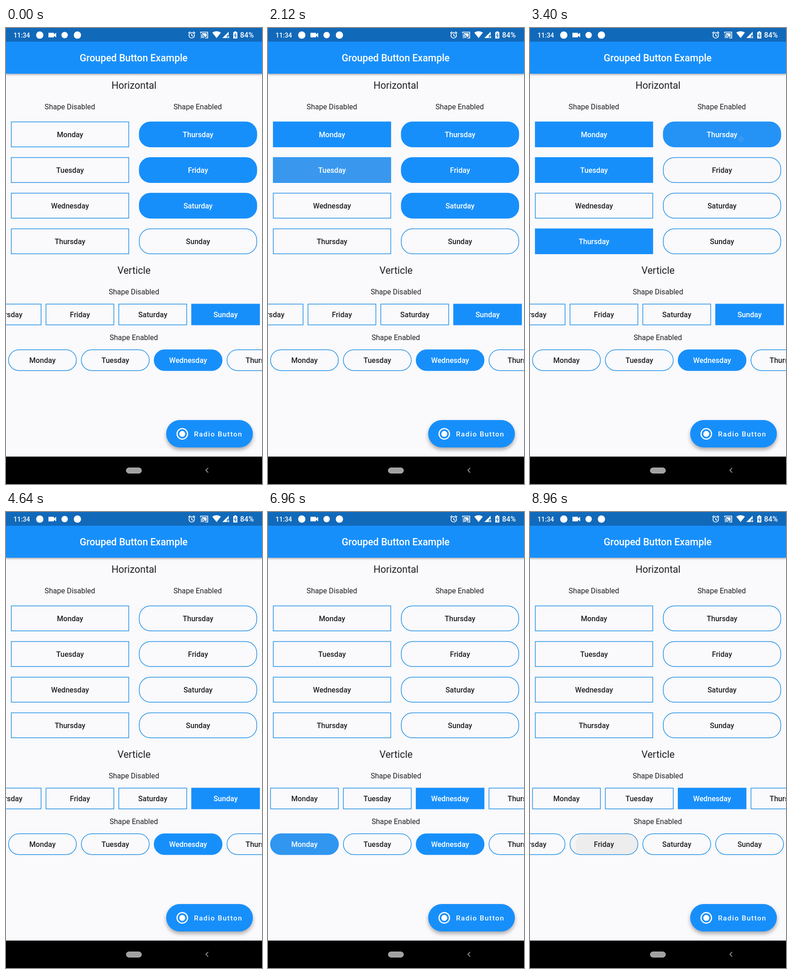
These frames come from a looping animation (561 by 998 pixels, 9 s). An HTML page:

```html
<!DOCTYPE html>
<html lang="en">
<head>
<meta charset="utf-8">
<title>Grouped buttons</title>
<style>
  html, body { margin: 0; width: 100%; height: 100%; overflow: hidden; }
  body { position: relative; background: #faf9fc; font-family: Roboto, sans-serif; }
  div, svg { position: absolute; left: 0; top: 0; }
  .status { width: 561px; height: 30px; background: #1169ba; }
  .bar { top: 30px; width: 561px; height: 70px; background: #178ffb; box-shadow: 0 2px 4px rgba(0,0,0,.34); }
  .nav { top: 938px; width: 561px; height: 60px; background: #000; }
  .fab { left: 351px; top: 858px; width: 190px; height: 60px; border-radius: 30px; background: #178ffb;
         box-shadow: 0 5px 9px rgba(0,0,0,.32); }
  .head { font-size: 21.5px; }
  .label { font-size: 16.1px; }
  .btn rect { fill: transparent; stroke: #2493e6; stroke-width: 1.5px; }
  .btn text { fill: #202124; font-size: 16.1px; font-weight: 500; text-anchor: middle; }
  .btn.on rect { fill: #178ffb; stroke: #178ffb; }
  .btn.on text { fill: #fff; }
  .ink { fill: #bcbcbc; }
  .glow { fill: #178ffb; opacity: .14; }
</style>
</head>
<body>
<div class="bar"></div>
<div class="status"></div>
<div class="nav"></div>
<div class="fab"></div>

<svg width="561" height="998" viewBox="0 0 561 998" fill="none">
  <g id="buttons"></g>
  <g fill="#202124" text-anchor="middle">
    <g class="head">
      <text x="280.5" y="132.6">Horizontal</text>
      <text x="280.5" y="538.3">Verticle</text>
    </g>
    <g class="label">
      <text x="140" y="177.5">Shape Disabled</text>
      <text x="420" y="177.5">Shape Enabled</text>
      <text x="280.3" y="583">Shape Disabled</text>
      <text x="280" y="683">Shape Enabled</text>
    </g>
  </g>
  <g fill="#fff" font-weight="500">
    <text x="279.8" y="73" font-size="21.3" text-anchor="middle">Grouped Button Example</text>
    <text x="412" y="893.8" font-size="15.3" letter-spacing="1.5">Radio Button</text>
    <text x="16.5" y="20.6" font-size="14.2">11:34</text>
    <text x="513" y="21" font-size="16">84%</text>
    <circle cx="74" cy="15.5" r="8"/>
    <circle cx="128.5" cy="15.5" r="7"/>
    <circle cx="156.5" cy="15.5" r="8"/>
    <path d="M93 10.5h12v3.5l5-3.5v10l-5-3.5v3.5h-12z"/>
    <path d="M452 10q9.5-6 19 0l-9.5 12z"/>
    <path d="M474 22L488 8v8h-4v6z"/>
    <path d="M498 9h2.5v-1.7h4V9h2.5v14h-9z"/>
    <path d="M429 11.500h10.500v8h-4q-1.500-5-6.500-6z"/>
    <circle cx="386.300" cy="888.300" r="6.500"/>
  </g>
  <g stroke="#fff" stroke-width="1.7">
    <circle cx="407" cy="16" r="6"/>
    <path d="M407 12.5v4l3 1.8M399.5 11.5l4-3.5M414.5 11.5l-4-3.5"/>
    <path d="M426.5 12V9h15.5v13h-5.5M426.5 21.5h2M426.5 18a4 4 0 0 1 4 4M426.5 15a7 7 0 0 1 7 7"/>
    <path d="M485 18l4 4m0-4l-4 4" stroke-width="1.3"/>
    <path d="M503.3 11.5l-2.5 5h3.5l-2.5 4.5" stroke="#1169ba" stroke-width="1.4"/>
    <circle cx="386.3" cy="888.3" r="11.5" stroke-width="2.5"/>
  </g>
  <rect x="263.5" y="962.5" width="33.5" height="12" rx="6" fill="#a2a2a2" stroke="#b8b8b8"/>
  <path d="M443 963l-5 5 5 5" stroke="#b0b0b0" stroke-width="1.5"/>
</svg>

<script>
const LOOP = 9000, TOGGLE = 100, TAP = 290;
const PITCH = 159.6, SCROLL = 556.3;
const days = ['Monday', 'Tuesday', 'Wednesday', 'Thursday', 'Friday', 'Saturday', 'Sunday'];
const root = document.getElementById('buttons');
const clamp = v => Math.max(0, Math.min(1, v));
let clipCount = 0;

function set(el, attrs) {
  for (const key in attrs) el.setAttribute(key, attrs[key]);
  return el;
}

function add(parent, tag, attrs = {}) {
  const el = document.createElementNS('http://www.w3.org/2000/svg', tag);
  parent.append(el);
  return set(el, attrs);
}

// taps: { day: [times] }, selected: days that begin filled
function makeButton(parent, day, x, y, size, selected, taps) {
  const { width, height } = size;
  const el = add(parent, 'g', { class: 'btn', transform: `translate(${x} ${y})` });
  const id = 'clip' + clipCount++;
  add(add(el, 'clipPath', { id }), 'rect', size);
  add(el, 'rect', size);
  const ink = add(el, 'g', { class: 'ink', 'clip-path': `url(#${id})` });
  const highlight = add(ink, 'path', { d: `M0 0H${width}V${height}H0z` });
  const splash = add(ink, 'circle', { cx: width * .66, cy: height * .69, opacity: .12 });
  add(el, 'text', { x: width / 2, y: height / 2 + 5.8 }).textContent = day;
  return { el, ink, highlight, splash, on: selected.includes(day), taps: taps[day] || [] };
}

function makeColumn(x, names, rx, selected, taps) {
  const size = { width: 257.4, height: 54.7, rx };
  return names.map((day, i) => makeButton(root, day, x, 205.5 + 78 * i, size, selected, taps));
}

function makeRow(y, rx, selected, taps) {
  const size = { width: 148.8, height: 45.4, rx };
  const strip = add(root, 'g');
  const buttons = days.map((day, i) => makeButton(strip, day, 5.5 + PITCH * i, y, size, selected, taps));
  const glow = add(root, 'ellipse', { class: 'glow', cy: y + 23, ry: 28 });
  return { strip, glow, buttons };
}

const firstRow = makeRow(604.3, 0, ['Monday', 'Tuesday', 'Wednesday', 'Sunday'],
  { Monday: [6080], Tuesday: [6290] });
const secondRow = makeRow(704.3, 22.7, ['Wednesday', 'Friday', 'Saturday', 'Sunday'],
  { Monday: [6740], Saturday: [7730], Sunday: [8060], Friday: [8840] });

const buttons = [
  ...makeColumn(11.6, days.slice(0, 4), 0, [],
    { Monday: [1360, 3830], Tuesday: [1920, 4070], Thursday: [2440, 4340] }),
  ...makeColumn(292.1, days.slice(3), 24.5, ['Thursday', 'Friday', 'Saturday'],
    { Saturday: [2900], Friday: [3120], Thursday: [3360] }),
  ...firstRow.buttons, ...secondRow.buttons
];

function drawButton(b, time) {
  const toggles = b.taps.filter(t => time >= t + TOGGLE).length;
  b.el.classList.toggle('on', b.on !== (toggles % 2 === 1));
  const start = b.taps.find(t => time >= t && time < t + TAP);
  const age = start === undefined ? 0 : time - start;
  set(b.ink, { opacity: age ? clamp((TAP - age) / 90) : 0 });
  set(b.highlight, { opacity: .1 * clamp(age / 50) });
  set(b.splash, { r: 6 * (age / 40) ** 2.4 });
}

function drawRow(row, time, start, duration, from, to) {
  const p = clamp((time - start) / duration);
  const eased = p * p * (3 - 2 * p);
  set(row.strip, { transform: `translate(${-(from + (to - from) * eased)} 0)` });
  // edge glow shrinks once the strip hits its end
  const g = (time - start - duration) / 300;
  set(row.glow, { cx: to > from ? 561 : 0, rx: g >= 0 && g < 1 ? 12 * (1 - g) : 0 });
}

function draw() {
  const time = performance.now() % LOOP;
  buttons.forEach(b => drawButton(b, time));
  drawRow(firstRow, time, 5060, 520, SCROLL, 0);
  drawRow(secondRow, time, 7140, 360, 0, SCROLL);
  requestAnimationFrame(draw);
}
draw();
</script>
</body>
</html>
```
